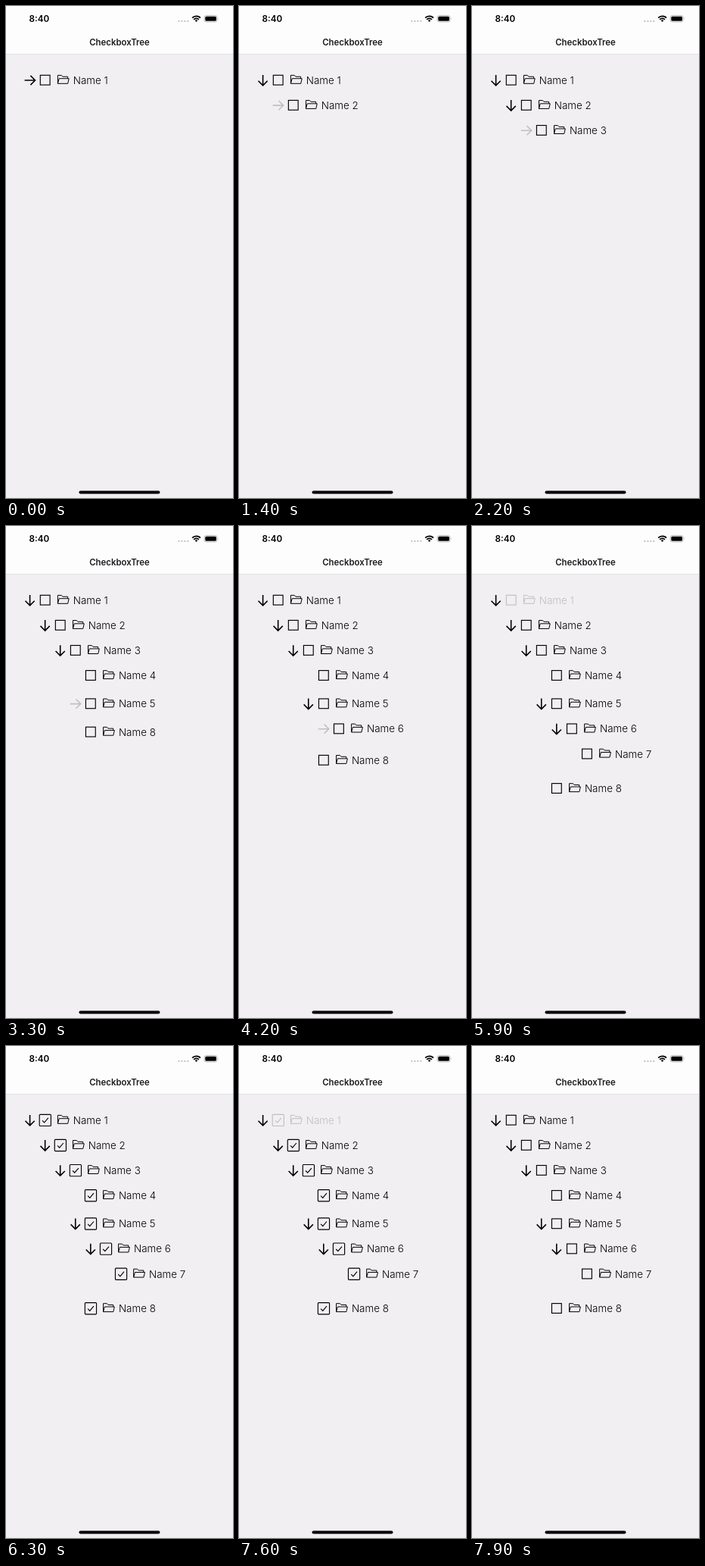
Animation of 300 by 649 pixels, one loop 8 s. Source, as an HTML page:

```html
<!DOCTYPE html>
<html lang="en">
<head>
<meta charset="utf-8">
<title>CheckboxTree</title>
<style>
  html, body { margin: 0; width: 100%; height: 100%; overflow: hidden; background: #f1eff2; }
  svg { display: block; font-family: Inter, sans-serif; }
  .line { fill: none; stroke: #000; }
  .semi { font-weight: 600; }
  .item text { font-size: 13.4px; font-weight: 300; }
</style>
</head>
<body>
<svg width="300" height="649" viewBox="0 0 300 649">
  <defs>
    <path id="arrow" class="line" stroke-width="1.6" d="M24.6 98H38.4M32.4 91.9L38.5 98L32.4 104.1"/>
    <rect id="empty" class="line" stroke-width="1.15" x="45.3" y="91.3" width="12.8" height="12.8"/>
    <g id="checked" class="line" stroke-width="1.15">
      <rect x="44.2" y="90.3" width="15.2" height="15.2" rx="1"/>
      <path d="M48 98.3L50.6 101L55.8 94.9"/>
    </g>
    <path id="folder" class="line" stroke-width="1" stroke-linejoin="round"
      d="M68.4 102.3V91.4H73.3L74.9 93.2H81.6V95.7M68.4 102.3L70.2 95.7H83.2L81.7 102.3Z"/>
  </defs>

  <rect width="300" height="63.5" fill="#fdfdfe"/>
  <rect y="63" width="300" height="1" fill="#e2e1e4"/>
  <text class="semi" x="30.5" y="21" font-size="11.7">8:40</text>
  <text class="semi" x="150" y="52.2" font-size="11.4" text-anchor="middle" fill="#1c1c1e">CheckboxTree</text>

  <path stroke="#b9b9bc" stroke-width="2.2" stroke-linecap="round" d="M228.4 20h0M232.4 20h0M236.3 20h0M240.2 20h0"/>
  <g class="line" stroke-width="1.7">
    <path d="M246.1 15.7A7.4 7.4 0 0 1 256.9 15.7"/>
    <path d="M248.1 17.8A4.7 4.7 0 0 1 254.9 17.8"/>
  </g>
  <path d="M251.5 21L249.7 19.2A2.6 2.6 0 0 1 253.3 19.2Z"/>
  <rect x="262.1" y="12.6" width="17" height="8.4" rx="2.5" fill="none" stroke="#a9a9ac" stroke-width=".8"/>
  <rect x="263.3" y="13.8" width="14.6" height="6" rx="1.5"/>
  <path d="M280.1 15.4Q281.3 16.8 280.1 18.2Z" fill="#a9a9ac"/>

  <g id="tree"></g>
  <rect x="96.5" y="639.6" width="107" height="3.8" rx="1.9"/>
</svg>

<script>
const LOOP = 8000, STEP = 100, RELEASE = 250;
const tree = document.getElementById('tree');

// openAt: when the arrow is pressed; leaves have none
const rows = [
  { name: 'Name 1', level: 0, y: 98, openAt: 500 },
  { name: 'Name 2', level: 1, y: 131.1, parent: 0, openAt: 1400 },
  { name: 'Name 3', level: 2, y: 164.2, parent: 1, openAt: 2200 },
  { name: 'Name 4', level: 3, y: 197.3, parent: 2 },
  { name: 'Name 5', level: 3, y: 234.6, parent: 2, openAt: 3300 },
  { name: 'Name 6', level: 4, y: 267.7, parent: 4, openAt: 4200 },
  { name: 'Name 7', level: 5, y: 300.8, parent: 5 },
  { name: 'Name 8', level: 3, y: 271.9, parent: 2, pushedBy: [4, 5] }
];
const CHECK = 5900, UNCHECK = 7600, PUSH = 37.2;

const easeInOut = k => k < .5 ? 2 * k * k : 1 - 2 * (1 - k) ** 2;

// Dim to 0.2 while pressed, then ease back after the release
function pressOpacity(t, pressedAt, lead = 50) {
  const since = t - pressedAt;
  if (since < 0) return 1;
  if (since < STEP) return .2;
  return .2 + .8 * easeInOut(Math.min(1, (since - STEP + lead) / RELEASE));
}

const isOpen = (row, t) => t >= row.openAt + STEP;

for (const row of rows) {
  const hasArrow = row.openAt !== undefined;
  const g = document.createElementNS('http://www.w3.org/2000/svg', 'g');
  g.innerHTML = (hasArrow ? '<use class="toggle" href="#arrow"/>' : '') +
    `<g class="item"><use class="box"/><use href="#folder"/>
     <text x="88.8" y="102.8">${row.name}</text></g>`;
  tree.append(g);
  row.group = g;
  for (const part of ['toggle', 'item', 'box']) row[part] = g.querySelector('.' + part);
}

function draw(t) {
  const checked = t >= CHECK + STEP && t < UNCHECK + STEP;
  for (const row of rows) {
    const visible = row.parent === undefined || isOpen(rows[row.parent], t);
    const pushes = (row.pushedBy || []).filter(i => isOpen(rows[i], t)).length;
    row.group.setAttribute('display', visible ? 'inline' : 'none');
    row.group.setAttribute('transform', `translate(${row.level * 20.05} ${row.y + pushes * PUSH - 98})`);
    row.box.setAttribute('href', checked ? '#checked' : '#empty');
    if (row.toggle) {
      row.toggle.setAttribute('transform', `rotate(${isOpen(row, t) ? 90 : 0} 31.6 98)`);
      row.toggle.setAttribute('opacity', pressOpacity(t, row.openAt));
    }
  }
  rows[0].item.setAttribute('opacity', t < UNCHECK ? pressOpacity(t, CHECK, 10) : pressOpacity(t, UNCHECK));
}

const start = performance.now();
function frame() {
  const t = (performance.now() - start) % LOOP;
  draw(Math.floor(t / STEP) * STEP);
  requestAnimationFrame(frame);
}
frame();
</script>
</body>
</html>
```
